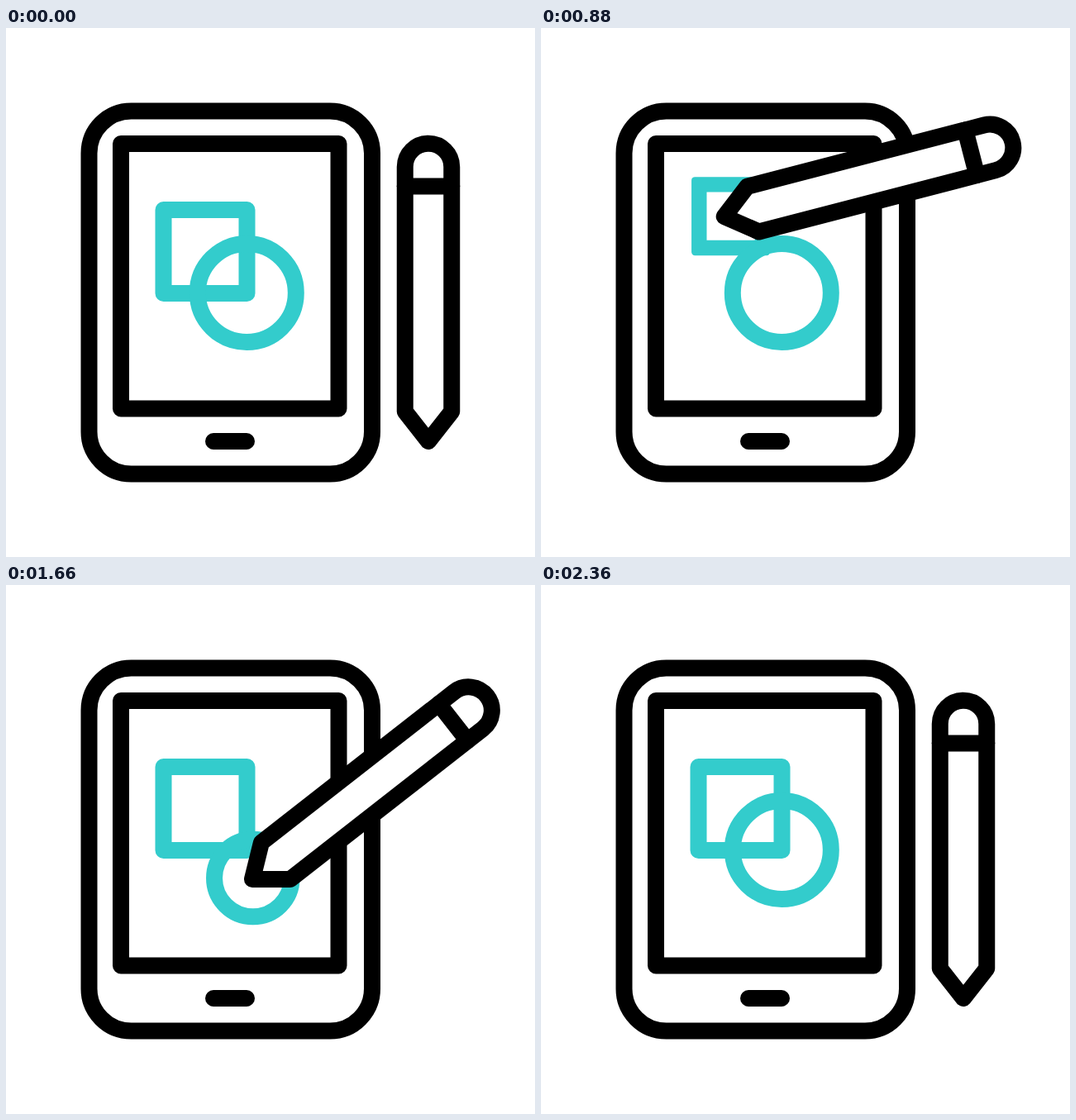
An HTML page for the animation above (2.4 s loop, 640 by 640 pixels).

```html
<!DOCTYPE html>
<html lang="en">
<head>
<meta charset="utf-8">
<title>Tablet and pencil</title>
<style>
  html, body { margin: 0; width: 100%; height: 100%; overflow: hidden; background: #fff; }
  svg { display: block; width: 100vw; height: 100vh; }
  .ink { fill: none; stroke: #000; stroke-width: 20; stroke-linejoin: round; stroke-linecap: round; }
</style>
</head>
<body>
<svg viewBox="0 0 640 640">
  <g class="ink">
    <rect x="100.5" y="100.5" width="342.5" height="439" rx="51"/>
    <rect x="139" y="140" width="263.5" height="320.5"/>
    <path d="M251 500H291"/>
  </g>
  <path id="square" fill="#3cc" fill-rule="evenodd"/>
  <circle id="ring" fill="none" stroke="#3cc" stroke-width="20"/>
  <g id="pencil" class="ink">
    <path fill="#fff" d="M-28.25 -152A28.25 28.25 0 0 1 28.25 -152V144L0 180L-28.25 144Z"/>
    <path d="M-28.25 -128.5H28.25"/>
  </g>
</svg>
<script>
const LOOP = 2400, TICK = 20;
const square = document.getElementById('square');
const ring = document.getElementById('ring');
const pencil = document.getElementById('pencil');

// Pencil: time, centre x, centre y, angle, sideways bow of the path leading here
const poses = [
  [200, 511, 320, 0, 0],
  [620, 380.5, 166.8, 55, -4],
  [920, 396.7, 183.8, 76.5, 0],
  [1200, 380.5, 166.8, 55, 0],
  [1480, 432.8, 212.2, 52, -2],
  [1840, 446.8, 278.2, 52, 0],
  [2080, 432.8, 212.2, 52, 0],
  [2360, 511, 320, 0, 0]
];

const ease = u => u * u * (3 - 2 * u);
const progress = (t, a, b) => ease(Math.min(1, Math.max(0, (t - a) / (b - a))));
const mix = (a, b, k) => a + (b - a) * k;

// 0 to 1 while dragged out, back to 0 on the way home
const drag = (t, start, peak, end) => progress(t, start, peak) - progress(t, peak, end);

function pencilAt(t) {
  let i = 1;
  while (i < poses.length - 1 && t > poses[i][0]) i++;
  const a = poses[i - 1], b = poses[i];
  const k = progress(t, a[0], b[0]);
  const bow = b[4] * 4 * k * (1 - k);
  return [mix(a[1], b[1], k) + bow, mix(a[2], b[2], k), mix(a[3], b[3], k)];
}

function frame(cx, cy, half, width, r) {
  const side = 2 * (half - r), hole = 2 * (half - width);
  const arc = (x, y) => `a${r} ${r} 0 0 1 ${x} ${y}`;
  return `M${cx - half + r} ${cy - half}h${side}${arc(r, r)}v${side}${arc(-r, r)}` +
    `h${-side}${arc(-r, -r)}v${-side}${arc(r, -r)}z` +
    `M${cx - hole / 2} ${cy - hole / 2}h${hole}v${hole}h${-hole}z`;
}

function draw(t) {
  const [x, y, angle] = pencilAt(t);
  pencil.setAttribute('transform', `translate(${x} ${y}) rotate(${angle})`);

  // Shapes shrink sooner than they travel
  const s = drag(t, 620, 920, 1200), press = Math.sqrt(Math.max(0, s));
  square.setAttribute('d', frame(241 - 12 * s, 270.5 - 45 * s,
    60.5 - 13.3 * press, 20 - 1.6 * press, 10 - 6 * press));

  const c = drag(t, 1480, 1840, 2080), squeeze = Math.sqrt(Math.max(0, c));
  ring.setAttribute('cx', 291.3 + 15 * c);
  ring.setAttribute('cy', 320.5 + 68 * c);
  ring.setAttribute('r', 59.5 - 18 * squeeze);
}

function loop() {
  const t = performance.now() % LOOP;
  draw(Math.floor(t / TICK) * TICK);
  requestAnimationFrame(loop);
}
draw(0);
requestAnimationFrame(loop);
</script>
</body>
</html>
```
